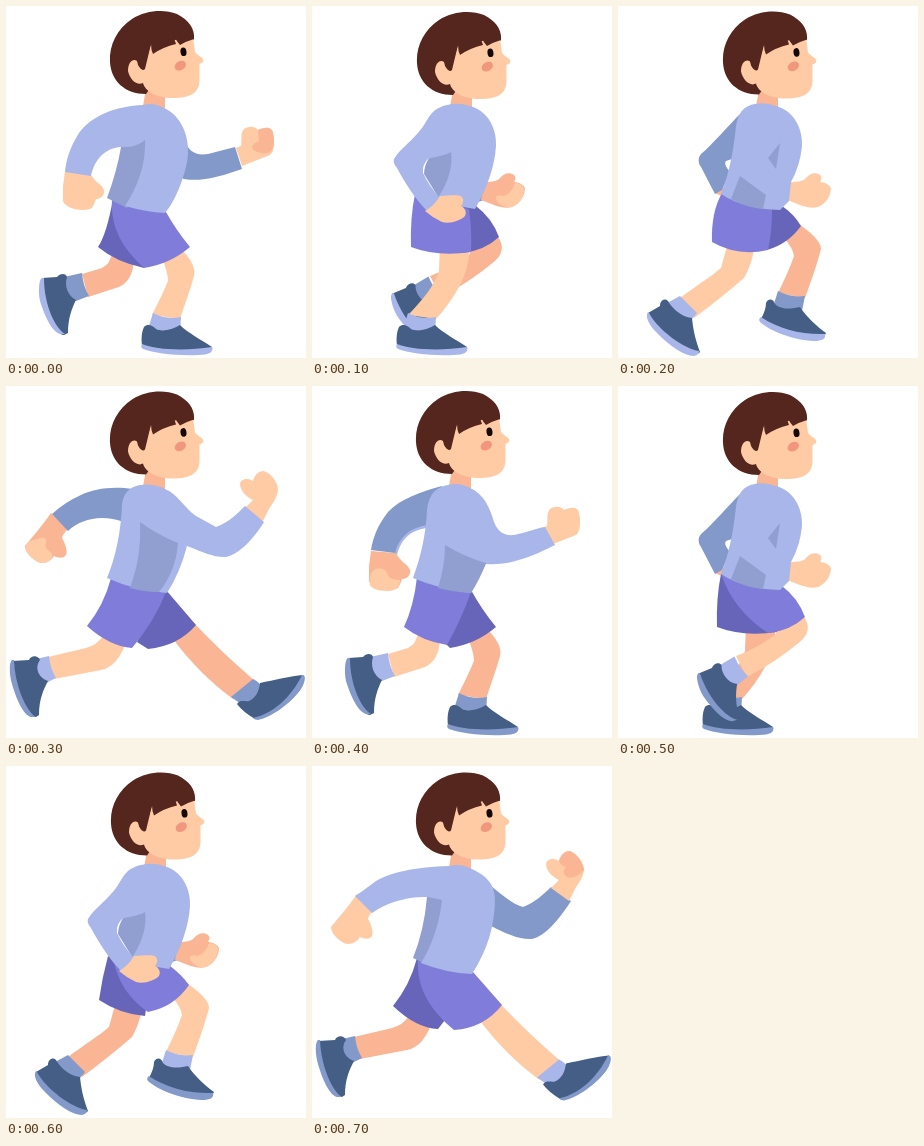
Recreate the animation shown at these times as an HTML page without scripts. Size 300 px wide and 352 px high, loop 0.8 s.

```html
<!DOCTYPE html>
<html lang="en">
<head>
<meta charset="utf-8">
<title>Running boy</title>
<style>
html, body { margin: 0; width: 100%; height: 100%; overflow: hidden; background: #fff; }
svg { display: block; width: 100vw; height: 100vh; }
.near { --skin: #ffcba5; --cloth: #a8b6ea; --short: #7f7dd9; }
.far { --skin: #f9b594; --cloth: #8299ca; --short: #6765ba; }
.skin { fill: var(--skin); }
.cloth { fill: var(--cloth); }
.short { fill: var(--short); }
.light { fill: #ffcba5; }
.dark { fill: #f9b594; }
.shade { fill: #909fd0; }
.shoe { fill: #445e85; }
.sole { fill: var(--sole, #8299ca); }
.hair { fill: #54261e; }
.pose { visibility: hidden; animation: show .8s step-end infinite; animation-delay: calc(var(--i) * .1s - .8s); }
.pale { --sole: #a8b6ea; }
@keyframes show { 0% { visibility: visible; } 12.5%, 100% { visibility: hidden; } }
</style>
</head>
<body>
<svg viewBox="0 0 300 352" xmlns="http://www.w3.org/2000/svg">
<defs>
  <g id="head">
    <path class="dark" d="M141 78L136 105H159V88Z"/>
    <path class="hair" d="M188 33C189 23 183 14 171 8C158 3 140 4 126 13C111 23 103 39 104 56C105 75 119 88 140 88L160 60Z"/>
    <path class="light" d="M187 31L189 46C191 49 196 51 197 53C198 56 196 57 193.500 58V74C193.500 87 184 92 167 92C150 92 139 85 137 77C131 80 124 74 122 65C122 56 127 52 131 55L137 64L145 38Z"/>
    <path class="hair" d="M188 33Q181 35 174 39Q170 35 168.500 29Q168 34 170 38Q157 41 147 48Q145 44 145 38L139 63Q136 66 132 59L130 50L150 25H186Z"/>
    <ellipse cx="177.500" cy="45.800" rx="3" ry="4.300" fill="#140707" transform="rotate(-8 177.500 46)"/>
    <ellipse cx="174.300" cy="59.700" rx="6" ry="4.500" fill="#f2977f" transform="rotate(-30 174.300 59.700)"/>
  </g>

  <!-- feet -->
  <g id="flat">
    <path class="cloth" d="M147 307Q160 314 175 311L174 327L142 323Z"/>
    <path class="shoe" d="M138 321C142 317 147 320 150 323C156 326 166 324 174 319C182 327 194 333 206 341C207 345 204 347 195 346C170 348 150 344 136 339C135 332 136 325 138 321Z"/>
    <path class="sole" d="M136 338C150 344 180 345 206 341C208 346 203 349 192 349C170 350 148 347 137 343Q134 341 136 338Z"/>
  </g>
  <g id="hang">
    <path class="cloth" d="M76 267Q77 280 83 290L70 295L58 290V271Z"/>
    <path class="shoe" d="M36 272L51 271C54 267 60 267 61 271C58 280 62 290 70 294C66 302 62 312 62 327L58 329C54 329 50 324 47 320C38 305 35 290 36 272Z"/>
    <path class="sole" d="M36 272C33 273 32 285 34 295C38 308 45 325 54 328L59 328C50 323 38 300 38 272Z"/>
  </g>

  <!-- legs: landing, passing, push-off, stride -->
  <g id="landFront">
    <path class="skin" d="M155 250L178 246C185 254 190 262 188 270C184 285 178 300 174 313L146 309C152 297 158 285 162 275Q162 266 155 250Z"/>
    <use href="#flat"/>
  </g>
  <g id="landBack">
    <path class="skin" d="M106 245L128 254C127 268 122 277 113 281L82 291L76 268L96 262Q105 258 106 245Z"/>
    <use href="#hang"/>
  </g>
  <g id="passStand">
    <path class="skin" d="M128 238L157 240C158 256 153 270 147 281Q137 299 124 313L96 309C109 296 123 279 127 265Z"/>
    <use href="#flat" x="-51"/>
  </g>
  <g id="passSwing">
    <path class="skin" d="M156 236L181 226C192 235 193 246 183 255Q158 276 129 291L118 270Q140 262 158 248Z"/>
    <use href="#hang" transform="translate(44 2) rotate(-18 79 279)"/>
  </g>
  <g id="pushFront">
    <path class="skin" d="M166 232L181 218C195 228 203 236 203 243C198 262 192 278 187 292L160 287C166 274 172 262 176 250Q175 242 166 232Z"/>
    <path class="cloth" d="M160 285Q173 292 187 290L184 305L155 301Z"/>
    <path class="shoe" d="M143 313C146 307 148 302 148 297C151 291 156 294 157 298C163 304 174 303 182 301C188 310 198 320 208 327C206 333 196 333 185 331C168 328 150 320 143 313Z"/>
    <path class="sole" d="M143 311C160 323 185 329 207 328C208 333 204 335 196 335C175 334 152 325 142 316Q140 313 143 311Z"/>
  </g>
  <g id="pushBack">
    <path class="skin" d="M109 240L136 244Q133 260 126 272Q103 292 76 312L62 292C78 280 94 270 103 262Z"/>
    <path class="cloth" d="M62 290L79 307L74 313L62 318L49 297Z"/>
    <path class="shoe" d="M30 307L42 300C42 294 47 292 50 295C54 302 63 311 74 312C75 322 77 333 82 346C78 350 72 349 65 345C48 336 32 322 30 307Z"/>
    <path class="sole" d="M30 306C27 310 30 318 40 328C52 340 66 350 76 350Q81 349 81 345C66 343 40 324 31 307Z"/>
  </g>
  <g id="strideFront">
    <path class="skin" d="M167 253L187 236C205 255 228 277 249 295L227 313C205 297 185 277 167 253Z"/>
    <path class="cloth" d="M225 311L247 293Q253 296 255 300L252 314L238 320Z"/>
    <path class="shoe" d="M231 318C234 313 239 316 243 315C250 312 253 305 254 297C268 294 285 290 297 289C299 296 296 303 288 311C278 322 262 330 249 333Q237 326 231 318Z"/>
    <path class="sole" d="M247 332C266 328 285 312 296 289C300 288 300 295 295 303C284 318 266 331 252 334Q249 334 247 332Z"/>
  </g>
  <g id="strideBack">
    <path class="skin" d="M97 250L119 259C114 272 106 282 95 284L48 293L42 271L80 262Q91 259 97 250Z"/>
    <path class="cloth" d="M43 270Q44 282 50 292L40 297L30 290V273Z"/>
    <path class="shoe" d="M6 275L23 274C25 269 32 269 34 274C28 282 33 292 42 295C38 303 33 312 33 329L30 331C26 331 22 328 20 326C12 312 5 295 6 275Z"/>
    <path class="sole" d="M6 274C3 276 3 288 6 298C10 312 17 329 25 331L30 331C20 325 9 300 8 274Z"/>
  </g>

  <!-- hands -->
  <path id="fist" class="skin" d="M230 142L235 140C236 135 234 127 238 123C244 119 250 121 252 124C258 121 266 120 267 127C269 137 268 146 264 149L236 160Z"/>
  <path id="low" class="skin" d="M59 165L57 180V195C60 204 80 206 86 202Q89 197 90 193C96 193 99 188 98 184C96 178 88 176 84 167Z"/>
  <path id="mid" class="skin" d="M172 176C180 176 186 175 188 172C192 167 198 166 202 169Q205 172 202 176C208 176 213 180 213 183C212 192 207 198 200 201C190 204 178 197 169 194Z"/>
  <path id="high" class="skin" d="M239 122L247 114C240 111 234 104 234 98C235 92 243 92 247 95C249 88 253 85 258 85C266 88 272 97 272 104C271 112 266 118 263 123L257 135Z"/>
  <path id="rear" class="skin" d="M45 127L62 143Q56 149 56 152C59 157 62 165 60 169C57 173 52 172 48 170C44 177 36 178 32 176C25 172 19 166 19 160C27 150 37 139 45 127Z"/>

  <!-- upper bodies -->
  <g id="landNear">
    <use href="#low" class="near"/>
    <path class="shade" d="M115 141L141 132V168L121 202L101 192Q111 165 115 141Z"/>
    <path class="near cloth" d="M137 99Q147 96 158 102C172 108 183 125 182 148C181 165 170 195 159 207Q140 206 119 200C132 180 140 158 139 134Q130 142 115 141C98 142 88 155 85 170L59 166C60 155 63 143 73 127C85 110 110 100 137 99Z"/>
  </g>
  <g id="landNearFar">
    <path class="far cloth" d="M178 132C182 146 190 150 202 148L229 141L236 163C214 171 188 178 172 171Z"/>
    <use href="#fist" class="near"/>
    <path class="dark" d="M252 124C258 121 266 120 267 127C269 137 268 145 262 147C256 148 247 146 246 141Q247 137 253 135Z"/>
  </g>
  <g id="landOther">
    <use href="#fist" class="near"/>
    <path class="near cloth" d="M136 99Q147 96 158 102C172 108 178 122 182 136C186 146 192 150 202 149C214 147 224 142 233 141L243 159C225 168 200 180 174 178L159 207Q130 204 101 192C109 170 114 148 115 124Q117 102 136 99Z"/>
    <path class="shade" d="M133 159Q153 171 174 177Q168 193 159 207Q141 206 126 202Q133 180 133 159Z"/>
  </g>
  <g id="landOtherFar" class="far">
    <use href="#low"/>
    <path class="light" d="M62 184C66 181 74 183 75 187C76 192 82 194 88 194C88 200 84 204 78 205C70 205 60 204 58 199C57 192 58 188 62 184Z"/>
    <path class="near cloth" d="M83 167L85 169C89 153 99 143 117 142V130L80 140Z"/>
    <path class="cloth" d="M130 100C108 106 88 113 76 126C65 140 61 152 59 164L83 167C87 151 98 141 117 139Z"/>
  </g>
  <g id="bentFar" class="far">
    <path class="skin" d="M97 187L106 181L108 192Z"/>
    <path class="cloth" d="M122 108C110 120 95 138 83 148Q78 154 83 161L97 188L104 184L112 166Q105 158 108 155L120 151Z"/>
  </g>
  <g id="bentFarNear" class="near">
    <use href="#mid"/>
    <path class="cloth" d="M137 98Q147 96 158 100C175 104 185 122 184 140Q182 160 173 176L171 195L162 204Q126 203 103 188C110 170 115 150 118 120Q121 100 137 98Z"/>
    <path class="shade" d="M122 170L148 189L145 203Q127 201 113 193ZM150 152L162 137L158 163Z"/>
  </g>
  <g id="bentNearFar" class="far">
    <path class="cloth" d="M168 178H174L172 194L163 197Z"/>
    <use href="#mid"/>
    <path class="light" d="M203 177C209 177 212 181 212 184C211 193 206 199 199 201C192 202 186 198 184 193C184 188 188 189 192 190Q200 187 203 177Z"/>
  </g>
  <g id="bentNear" class="near">
    <path class="shade" d="M117 152L140 144L142 175L128 194L112 168Q112 160 117 152Z"/>
    <path class="cloth" d="M135 99Q147 96 158 100C175 104 185 122 184 140Q182 170 163 203L128 197L127 190C137 175 141 158 139 146Q132 150 117 152Q110 158 111 167Q117 180 128 192Q122 202 115 205C104 194 93 177 85 162Q79 155 84 150C88 144 97 137 105 128C117 116 116 103 135 99Z"/>
    <path class="skin" d="M113 205Q122 200 128 190C136 190 146 188 150 191Q153 195 149 200C153 202 155 206 153 210C148 215 138 218 130 216Q121 212 113 205Z"/>
  </g>
  <g id="strideFar" class="far">
    <use href="#rear"/>
    <path class="light" d="M20 158C24 154 30 154 34 152C38 151 42 153 40 157Q38 161 43 165C47 168 47 170 46 172C42 178 35 178 31 175C24 171 18 165 20 158Z"/>
    <path class="cloth" d="M127 103C105 100 88 103 75 109Q59 116 46 128L62 145C75 133 95 128 118 136Z"/>
  </g>
  <g id="strideFarNear" class="near">
    <use href="#high"/>
    <path class="cloth" d="M134 99Q147 97 159 103C172 108 178 122 190 130L210 141C222 137 232 127 239 120L258 136C248 152 234 168 220 171C210 172 196 166 181 160Q174 187 161 207Q130 205 101 192C110 170 115 145 116 118Q118 102 134 99Z"/>
    <path class="shade" d="M134 136Q152 149 172 157Q170 185 153 206Q138 206 124 202C132 180 135 160 134 136Z"/>
  </g>
  <g id="strideNearFar">
    <path class="far cloth" d="M174 116C188 127 200 138 211 141C222 137 232 128 239 121L259 135C248 152 234 170 220 173C208 174 195 168 179 160Z"/>
    <use href="#high" class="near"/>
    <path class="dark" d="M247 95C249 88 254 85 258 85C265 88 271 97 272 104C267 110 260 113 255 111Q249 106 254 101Q249 100 247 95Z"/>
  </g>
  <g id="strideNear">
    <use href="#rear" class="near" y="1"/>
    <path class="shade" d="M115 131H132L118 200L101 192Q112 165 115 131Z"/>
    <path class="near cloth" d="M137 100Q149 97 160 103C175 110 182 118 183 132C183 160 175 185 160 208Q134 207 109 197C120 180 128 155 130 134L116 131C97 130 75 136 60 147L43 130Q51 125 60 118C75 106 105 101 137 100Z"/>
  </g>
</defs>

<rect width="300" height="352" fill="#fff"/>

<g class="pose pale" style="--i:0">
  <use href="#landNearFar"/>
  <use href="#landBack" class="far"/>
  <use href="#landFront" class="near"/>
  <path class="far short" d="M107 193C103 215 98 232 92 241Q110 256 138 262L140 210Z"/>
  <path class="near short" d="M107 193L160 206Q170 224 184 241Q164 258 138 262C120 245 104 225 106 193Z"/>
  <use href="#head"/>
  <use href="#landNear"/>
</g>

<g class="pose pale" style="--i:1">
  <use href="#bentNearFar"/>
  <use href="#passSwing" class="far"/>
  <use href="#passStand" class="near"/>
  <path class="far short" d="M145 200L164 200Q180 212 187 231Q172 245 150 247Z"/>
  <path class="near short" d="M103 188L157 203Q160 224 159 246Q125 251 99 241Q98 212 103 188Z"/>
  <use href="#head" x="1" y="1"/>
  <use href="#bentNear"/>
</g>

<g class="pose pale" style="--i:2">
  <use href="#bentFar"/>
  <use href="#pushFront" class="far"/>
  <use href="#pushBack" class="near"/>
  <path class="far short" d="M150 200H164Q176 208 183 220Q170 238 149 244Z"/>
  <path class="near short" d="M104 187L154 203Q154 226 150 244Q120 251 94 236Q93 206 104 187Z"/>
  <use href="#head" x="1" y=".6"/>
  <use href="#bentFarNear"/>
</g>

<g class="pose" style="--i:3">
  <use href="#strideFar"/>
  <use href="#strideFront" class="far"/>
  <use href="#strideBack" class="near"/>
  <path class="far short" d="M155 204H160L190 239Q172 260 142 263L131 256Z"/>
  <path class="near short" d="M105 192L160 206Q148 236 126 262Q103 260 81 240Q98 219 105 192Z"/>
  <use href="#head" y=".6"/>
  <use href="#strideFarNear"/>
</g>

<g class="pose" style="--i:4">
  <use href="#landOtherFar"/>
  <use href="#landFront" class="far"/>
  <use href="#landBack" class="near"/>
  <path class="far short" d="M155 204H159Q170 224 184 241Q164 258 138 262L133 257Z"/>
  <path class="near short" d="M105 191L159 206Q149 234 135 259Q110 255 92 241Q102 219 105 191Z"/>
  <use href="#head"/>
  <use href="#landOther"/>
</g>

<g class="pose" style="--i:5">
  <use href="#bentFar"/>
  <use href="#passStand" class="far"/>
  <use href="#passSwing" class="near"/>
  <path class="far short" d="M103 188L157 203L159 246Q125 251 99 241Q98 212 103 188Z"/>
  <path class="near short" d="M103 188L164 200Q180 212 187 231Q172 245 150 247Q116 225 103 188Z"/>
  <use href="#head" x="1" y="1"/>
  <use href="#bentFarNear"/>
</g>

<g class="pose" style="--i:6">
  <use href="#bentNearFar"/>
  <use href="#pushBack" class="far" y="-1"/>
  <use href="#pushFront" class="near" y="-1"/>
  <path class="far short" d="M102 190Q96 212 93 234Q114 248 139 250L145 210Z"/>
  <path class="near short" d="M107 192L164 200Q175 208 183 219Q168 241 142 246Q113 226 107 192Z"/>
  <use href="#head" x="1" y="1.500"/>
  <use href="#bentNear"/>
</g>

<g class="pose" style="--i:7">
  <use href="#strideNearFar"/>
  <use href="#strideBack" class="far"/>
  <use href="#strideFront" class="near" y=".5"/>
  <path class="far short" d="M105 192Q98 219 81 240Q104 262 126 263L133 254L130 215Z"/>
  <path class="near short" d="M106 192L161 206L190 239Q172 262 142 264C118 244 104 222 106 192Z"/>
  <use href="#head" y="1.500"/>
  <use href="#strideNear"/>
</g>
</svg>
</body>
</html>
```
